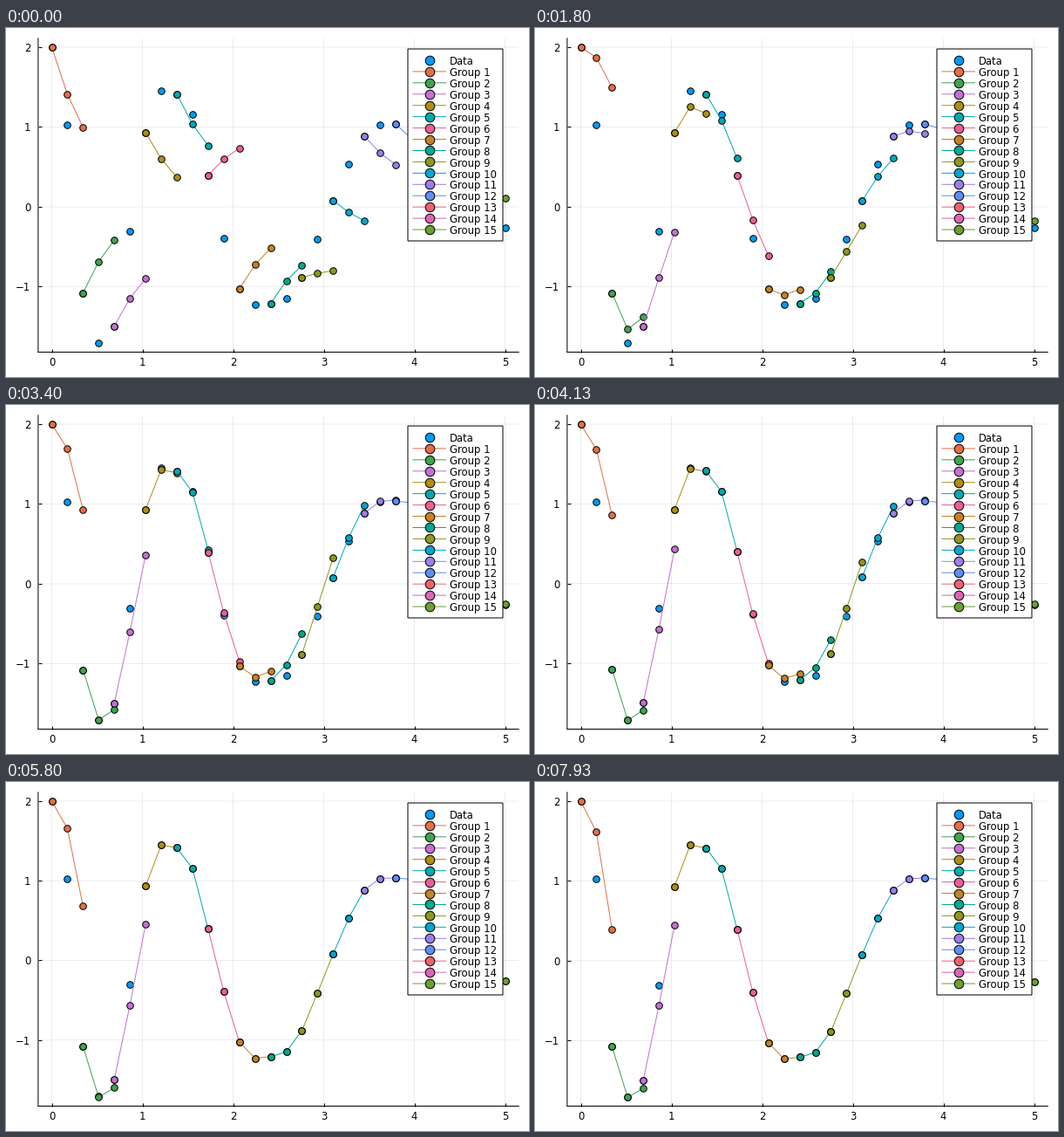
A matplotlib script that plays this animation: 600 px wide and 400 px high, repeating every 8000 ms.

```python
import numpy as np
import matplotlib.pyplot as plt
from matplotlib.animation import FuncAnimation
from matplotlib.patches import Rectangle

W, H, DPI = 600, 400, 100
PX = 72 / DPI            # points per pixel
FONT = 11.6 * PX
FRAMES, LOOP = 120, 8000
LEFT, RIGHT, TOP, BOTTOM = 36.9, 588.2, 11.8, 371.5

plt.rcParams["font.family"] = "DejaVu Sans"
plt.rcParams["path.snap"] = False

COLORS = ["#009AFA", "#E36F47", "#3EA44E", "#C371D2", "#AC8E18", "#00AAAE",
          "#ED5E93", "#C68225", "#00A98D", "#8E971E", "#00A9CC", "#9B7FE9",
          "#618DF6", "#F06073", "#DD65B6", "#6D9F33"]

# Step of each group's untrained guess from its first point to its second
STEPS = [-0.59, 0.39, 0.35, -0.33, -0.38, 0.2, 0.3, 0.28, 0.05, -0.15,
         -0.21, -0.18, -0.15, -0.05, 0.085]
# Frames a group needs to learn, where not the usual
PACE = {2: 18, 3: 34, 5: 34, 9: 28, 10: 23}
# Early groups rest away from the data and go on drifting
REST = {1: (1.71, 1.03), 2: (-1.73, -1.6), 3: (-0.56, 0.45)}
DRIFT = {1: (-0.1, -0.65), 2: (0.02, 0.0)}


def spiral(n=30, t_end=5.0, sub=200):
    """First component of a damped cubic spiral, integrated with RK4."""
    A = np.array([[-0.1, 2.0], [-2.0, -0.1]])
    f = lambda u: (u ** 3) @ A
    u, h, out = np.array([2.0, 0.0]), t_end / (n - 1) / sub, [2.0]
    for _ in range(n - 1):
        for _ in range(sub):
            k1 = f(u)
            k2 = f(u + h / 2 * k1)
            k3 = f(u + h / 2 * k2)
            k4 = f(u + h * k3)
            u = u + h / 6 * (k1 + 2 * k2 + 2 * k3 + k4)
        out.append(u[0])
    return np.array(out)


def bell(x, mid, width):
    return np.exp(-((x - mid) / width) ** 2)


times = np.linspace(0, 5, 30)
data = spiral()
frame = np.arange(FRAMES)[:, None]


def group_path(g):
    """Points of a group in every frame: a nearly straight guess bends to its goal."""
    idx = np.arange(2 * g - 2, min(2 * g + 1, 30))
    n = len(idx)
    guess = data[idx[0]] + STEPS[g - 1] * np.array([0, 1, 1.7])[:n]
    goal = data[idx]
    if g in REST:
        goal = np.array([goal[0], *REST[g]])
    pace = PACE.get(g, 21)
    left = np.exp(-(frame / pace) ** (pace / 14))
    path = goal + (guess - goal) * left
    path = path + np.array([0, *DRIFT.get(g, (0, 0))])[:n] * (frame / (FRAMES - 1)) ** 2
    # overshoots: the first group early, the middle groups later
    if g == 1:
        path = path + bell(frame, 32, 10) * np.array([0, 0.3, 0.65])
    rebound = 0.3 * bell(g, 8.6, 1.5)
    path = path + rebound * bell(frame, 51, 17) * np.array([0, 0.5, 1])[:n]
    return times[idx], path


groups = [group_path(g) for g in range(1, 16)]
lowest = np.minimum(data.min(), np.min([p.min(axis=1) for _, p in groups], axis=0))
highest = np.maximum(data.max(), np.max([p.max(axis=1) for _, p in groups], axis=0))

fig = plt.figure(figsize=(W / DPI, H / DPI), dpi=DPI, facecolor="white")
ax = fig.add_axes([LEFT / W, 1 - BOTTOM / H, (RIGHT - LEFT) / W, (BOTTOM - TOP) / H])
ax.set_xlim(-0.15, 5.15)
ax.set_xticks(range(6), [str(i) for i in range(6)])
ax.set_yticks([-1, 0, 1, 2], ["\u22121", "0", "1", "2"])
ax.tick_params(direction="in", length=4 * PX, width=PX, labelsize=FONT)
ax.tick_params(axis="x", pad=5.5 * PX)
ax.tick_params(axis="y", pad=8.5 * PX)
ax.set_axisbelow(True)
ax.grid(color="black", alpha=0.1, linewidth=0.7 * PX)
for side in ("top", "right"):
    ax.spines[side].set_visible(False)
for side in ("left", "bottom"):
    ax.spines[side].set_linewidth(PX)


def dots(color, size=7.6):
    return dict(marker="o", markersize=size * PX, markerfacecolor=color,
                markeredgecolor="black", markeredgewidth=PX)


ax.plot(times, data, linestyle="none", clip_on=False, zorder=3, **dots(COLORS[0]))
lines = [ax.plot(x, p[0], color=c, linewidth=PX, clip_on=False, zorder=3, **dots(c))[0]
         for (x, p), c in zip(groups, COLORS[1:])]

# Legend, laid out in pixels
top = fig.add_axes([0, 0, 1, 1], zorder=5)
top.set(xlim=(0, W), ylim=(H, 0))
top.axis("off")
top.add_patch(Rectangle((461, 24), 109, 220, facecolor="white",
                        edgecolor="black", linewidth=PX))
row = 220 / (len(COLORS) + 1)
for i, color in enumerate(COLORS):
    y = 24 + row * (i + 1)
    if i:
        top.plot([467, 504.5], [y, y], color=color, linewidth=PX)
    top.plot([485.6], [y], **dots(color, 10.6))
    top.text(509.3, y + 5.2, f"Group {i}" if i else "Data", fontsize=FONT, va="baseline")


def draw(k):
    pad = 0.03 * (highest[k] - lowest[k])
    ax.set_ylim(lowest[k] - pad, highest[k] + pad)
    for line, (_, path) in zip(lines, groups):
        line.set_ydata(path[k])
    return lines


anim = FuncAnimation(fig, draw, frames=FRAMES, interval=LOOP / FRAMES,
                     repeat=True, repeat_delay=0, blit=False)
plt.show()
```
